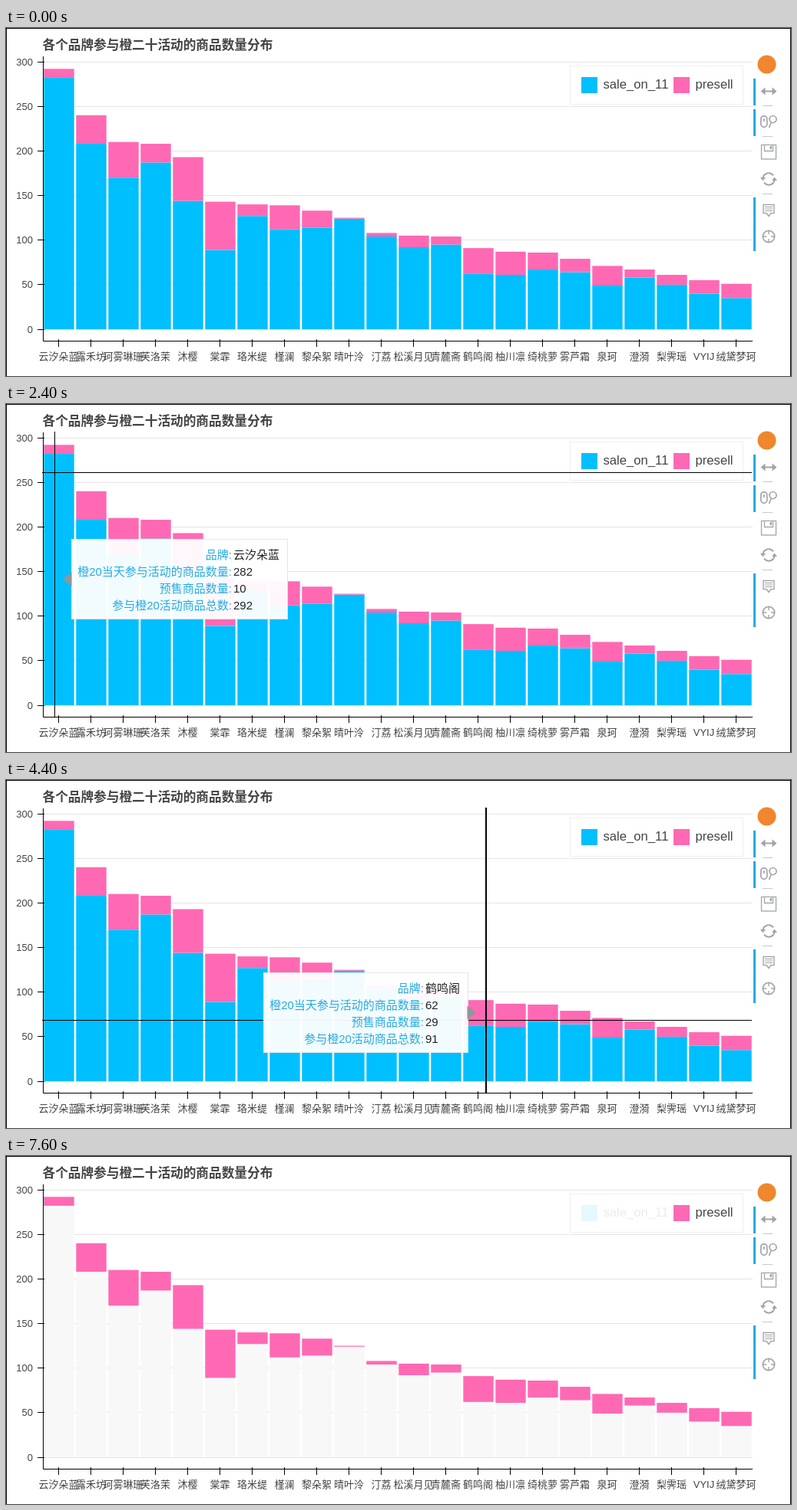
An HTML page for the animation above (8 s loop, 1022 by 454 pixels).

```html
<!DOCTYPE html>
<html lang="zh-CN">
<head>
<meta charset="utf-8">
<title>Stacked bar chart</title>
<style>
html, body { margin: 0; width: 100%; height: 100%; overflow: hidden; background: #fff; }
svg { display: block; }
text { font-family: "Liberation Sans", "Noto Sans CJK SC", "Noto Sans CJK JP", sans-serif; fill: #444; white-space: pre; }
.icon { fill: none; stroke: #a1a6a9; stroke-width: 1.7; }
.solid { fill: #a1a6a9; }
</style>
</head>
<body>
<svg id="stage" width="1022" height="454" viewBox="0 0 1022 454">
  <g id="plot"></g>
  <g id="legend">
    <rect x="734.5" y="49.5" width="225" height="50" fill="#fff" fill-opacity=".95" stroke="#e5e5e5" stroke-opacity=".6"/>
    <g id="saleKey">
      <rect x="749" y="64" width="21" height="21" fill="#00bfff"/>
      <text x="777.5" y="79" font-size="16.67">sale_on_11</text>
    </g>
    <rect x="869" y="64" width="21" height="21" fill="#ff69b4"/>
    <text x="897.5" y="79" font-size="16.67">presell</text>
  </g>
  <g id="tools">
    <circle cx="990.5" cy="47.5" r="12" fill="#f0862d"/>
    <path d="M973 66h3v35h-3zM973 106h3v35h-3zM973 221h3v70h-3z" fill="#26aae1"/>
    <path d="M985 101.5h13M985 141.5h13M985 216.5h13" stroke="#c8c8c8"/>
    <g class="icon">
      <path d="M986 82.500h14" stroke-width="2"/>
      <path class="solid" stroke="none" d="M982.500 82.500l6-5v10zM1003.500 82.500l-6-5v10z"/>
      <rect x="982.800" y="114.800" width="8" height="14.500" rx="4"/>
      <path d="M986.800 118v4M996 123.500l-2.500 6.500"/>
      <circle cx="998.500" cy="119" r="4.500"/>
      <rect x="983.500" y="152.500" width="19" height="18.500" stroke-width="1.300"/>
      <path d="M987.500 153v7.500h11v-7.500" stroke-width="1.300"/>
      <path class="solid" stroke="none" d="M994.500 154h2.500v4h-2.500z"/>
      <path d="M985.500 195.500a7.500 7.500 0 0 1 13.500-3M1000.500 198.500a7.500 7.500 0 0 1-13.500 3" stroke-width="2"/>
      <path class="solid" stroke="none" d="M982 195h7l-3.500 4.500zM1004 199h-7l3.500-4.500z"/>
      <path d="M986 230.500h14v11h-4l-3 4-3-4h-4z" stroke-width="1.400"/>
      <path d="M988 233.500h10M988 236h10M988 238.500h10" stroke-width="1.200"/>
      <circle cx="993" cy="272" r="7.700"/>
      <path d="M993 264v5M993 275v5M985 272h5M996 272h5" stroke-width="1.400"/>
    </g>
  </g>
  <path d="M0 .5h1022M.5 0v454M1021.500 0v454" stroke="#000"/>
  <g id="cross">
    <rect id="vLine" y="36" height="372"/>
    <rect id="hLine" x="47" width="924"/>
  </g>
  <g id="tip"></g>
</svg>
<script>
// name, total, sold on the day
const brands = [
  ['云汐朵蓝', 292, 282], ['露禾坊', 240, 208], ['珂雾琳珊', 210, 170], ['芙洛茉', 208, 187],
  ['沐樱', 193, 144], ['棠霏', 143, 89], ['珞米缇', 140, 127], ['槿澜', 139, 112],
  ['黎朵絮', 133, 114], ['晴叶泠', 125, 124], ['汀荔', 108, 104], ['松溪月见', 105, 92],
  ['青麓斋', 104, 95], ['鹤鸣阁', 91, 62], ['柚川凛', 87, 61], ['绮桃萝', 86, 67],
  ['雾芦霜', 79, 64], ['泉珂', 71, 49], ['澄漪', 67, 58], ['梨霁瑶', 61, 50],
  ['VYIJ', 55, 40], ['绒黛梦珂', 51, 35]
];

// pointer path: time, crosshair x, crosshair y, tooltip y
const path = [
  [300, 463.5, 115.5, 115], [400, 368.5, 127.5, 127], [500, 368.5, 127.5, 127],
  [1100, 237.5, 189.5, 195.5], [1200, 237.5, 189.5, 195.5],
  [1600, 111.5, 130.5, 130.5], [2000, 80.5, 58.5, 58.5], [2300, 80.5, 58.5, 58.5],
  [2400, 63.5, 89.5, 227.5], [2500, 66, 228, 240], [3200, 200, 285, 297],
  [3400, 218.5, 292, 307.5], [4100, 505, 322, 318], [4400, 625, 313.5, 302.5],
  [4900, 783, 316, 311.5], [5000, 800, 305, 302], [5300, 845, 255, 255],
  [5400, 845, 255, 255], [5500, 851.5, 230.5, 230.5], [6300, 800.5, 130.5, 130.5],
  [6400, 790.5, 112.5, 112.5]
];
const LOOP = 8000, STEP = 100, LEAVE = 6500, MUTE = 7600;

const $ = id => document.getElementById(id);
const yOf = v => 393 - v * 1.1633;
const center = i => 69 + 42 * i;

function add(parent, tag, attrs, content) {
  const el = document.createElementNS('http://www.w3.org/2000/svg', tag);
  set(el, attrs);
  if (content !== undefined) el.textContent = content;
  parent.appendChild(el);
  return el;
}
function set(el, attrs) {
  for (const k in attrs) el.setAttribute(k, attrs[k]);
}

const plot = $('plot');
const saleBars = [];

function drawPlot() {
  add(plot, 'text', { x: 47.5, y: 28, 'font-size': 16.67, 'font-weight': 700 },
    '各个品牌参与橙二十活动的商品数量分布');
  let ticks = '';
  for (let v = 0; v <= 300; v += 50) {
    const y = Math.floor(yOf(v)) + 0.5;
    add(plot, 'path', { d: `M48 ${y}H972`, stroke: '#e5e5e5' });
    add(plot, 'text', { x: 35, y: y + 4.5, 'font-size': 13, 'text-anchor': 'end' }, v);
    ticks += `M41 ${y}H50`;
  }
  brands.forEach(([name, total, sale], i) => {
    const x = center(i) - 19.7, width = 39.4;
    const bar = (hi, lo, fill) =>
      add(plot, 'rect', { x, y: yOf(hi), width, height: (hi - lo) * 1.1633, fill });
    saleBars.push(bar(sale, 0, '#00bfff'));
    bar(total, sale, '#ff69b4');
    add(plot, 'text', { x: center(i) - 0.5, y: 433, 'font-size': 13, 'text-anchor': 'middle' }, name);
    ticks += `M${center(i) - 0.5} 406V416`;
  });
  add(plot, 'path', { d: 'M48.5 37V408.500H972' + ticks, fill: 'none', stroke: '#000' });
}

const tip = $('tip');
const tipBox = add(tip, 'rect', { height: 104, fill: '#fff', 'fill-opacity': 0.95, stroke: '#e5e5e5' });
const tipArrow = add(tip, 'path', { fill: '#909599' });
const tipRows = ['品牌:', '橙20当天参与活动的商品数量:', '预售商品数量:', '参与橙20活动商品总数:'].map(label => ({
  label: add(tip, 'text', { 'font-size': 15, 'text-anchor': 'end', style: 'fill:#26aae1' }, label),
  value: add(tip, 'text', { 'font-size': 15, style: 'fill:#222' })
}));

function showTip(i, y) {
  const [name, total, sale] = brands[i];
  const c = center(i), onRight = c < 510;
  const width = 221 + name.length * (/\w/.test(name) ? 7 : 15);
  const left = onRight ? c + 16.5 : c - 13.5 - width;
  const top = Math.round(y - 52) + 0.5;
  const mid = top + 52;
  set(tipBox, { x: left, y: top, width });
  set(tipArrow, {
    d: onRight ? `M${c + 5} ${mid}l11.500-9v18z` : `M${c - 3} ${mid}l-11.500-9v18z`
  });
  [name, sale, total - sale, total].forEach((v, k) => {
    const row = tipRows[k], base = top + 25 + 22 * k;
    set(row.label, { x: left + 208.5, y: base });
    set(row.value, { x: left + 210.5, y: base });
    row.value.textContent = v;
  });
}

function pointerAt(t) {
  if (t < path[0][0] || t >= LEAVE) return null;
  const k = path.findIndex(p => p[0] >= t);
  if (k === 0) return path[0].slice(1);
  const a = path[k - 1], b = path[k], f = (t - a[0]) / (b[0] - a[0]);
  return [1, 2, 3].map(j => a[j] + (b[j] - a[j]) * f);
}

// whole-pixel positions cover two pixels, half positions one
function placeLine(el, axis, size, v) {
  const p = Math.round(v * 2) / 2, w = p % 1 ? 1 : 2;
  set(el, { [axis]: p - w / 2, [size]: w });
}

function render(t) {
  const p = pointerAt(t);
  $('cross').style.display = p ? '' : 'none';
  let hit = -1;
  if (p) {
    const [x, y, tipY] = p;
    placeLine($('vLine'), 'x', 'width', x);
    placeLine($('hLine'), 'y', 'height', y);
    const i = Math.floor((x - 48) / 42);
    if (brands[i] && Math.abs(x - center(i)) <= 20 && tipY >= yOf(brands[i][1])) hit = i;
    if (hit >= 0) showTip(hit, tipY);
  }
  tip.style.display = hit >= 0 ? '' : 'none';

  const muted = t >= MUTE;
  saleBars.forEach(bar => bar.setAttribute('fill', muted ? '#f8f8f8' : '#00bfff'));
  $('saleKey').setAttribute('opacity', muted ? 0.1 : 1);
}

drawPlot();
const start = performance.now();
let last = -1;
function tick() {
  const t = Math.floor((performance.now() - start) % LOOP / STEP) * STEP;
  if (t !== last) render(last = t);
  requestAnimationFrame(tick);
}
tick();
</script>
</body>
</html>
```
